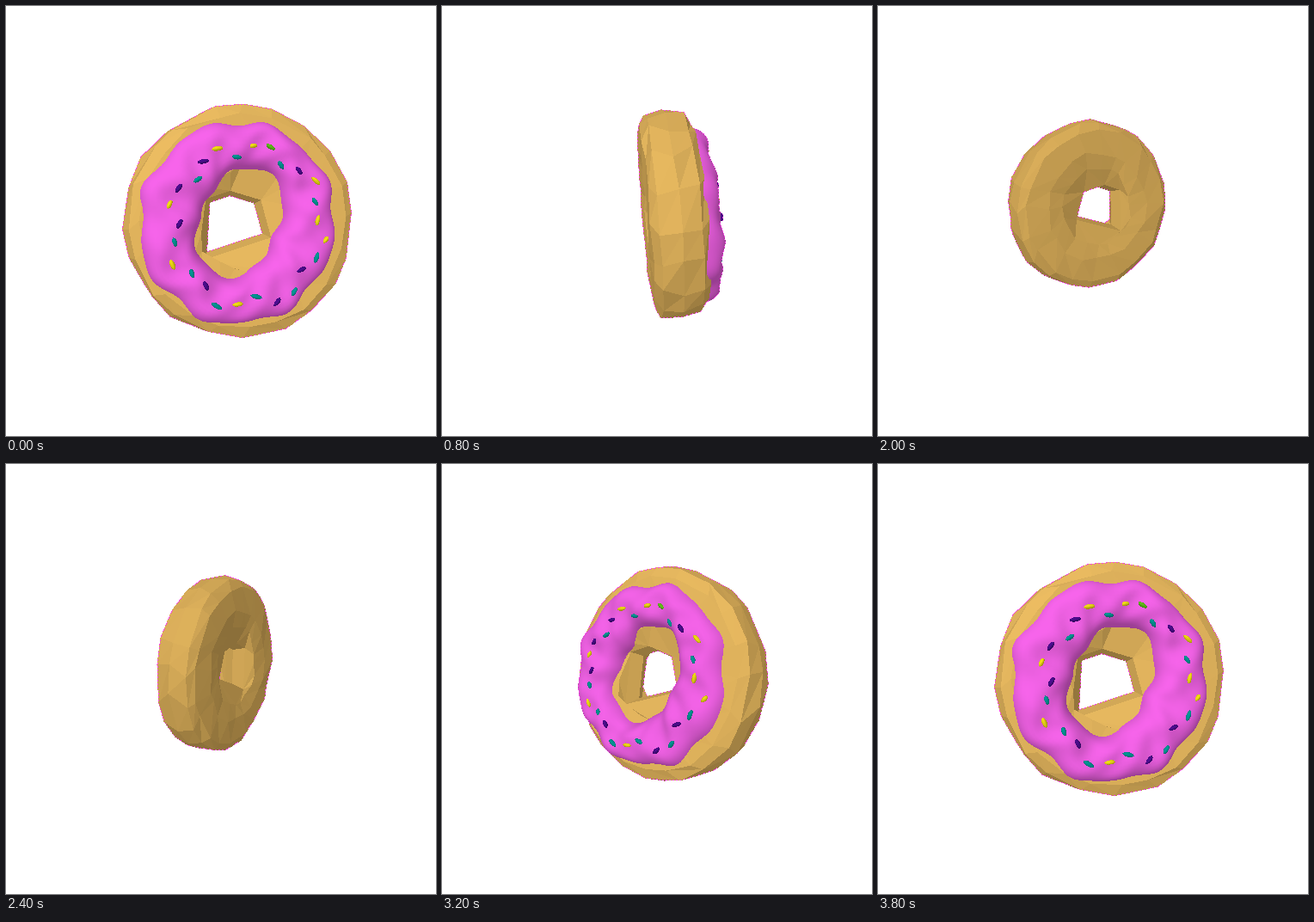
Animation of 500 by 500 pixels, one loop 3.9 s. Source, as an HTML page with a canvas:

```html
<!DOCTYPE html>
<html lang="en">
<head>
<meta charset="utf-8">
<title>Turning donut</title>
<style>
html, body { margin: 0; height: 100%; overflow: hidden; background: #fff; }
canvas { display: block; width: 100vmin; height: 100vmin; }
</style>
</head>
<body>
<canvas id="view" width="500" height="500"></canvas>
<script>
const SIZE = 500, TAU = Math.PI * 2, RAD = Math.PI / 180;
const { sin, cos, abs, sign, hypot, atan2, min, max, floor, ceil, PI } = Math;
const ctx = document.getElementById('view').getContext('2d');
const image = ctx.createImageData(SIZE, SIZE);
const depth = new Float32Array(SIZE * SIZE);

const lerp = (a, b, u) => a + (b - a) * u;
const wrap = a => ((a % TAU) + TAU) % TAU;
let seed = 11;
const jitter = n => {
  seed = (seed * 16807) % 2147483647;
  return (seed / 2147483647 * 2 - 1) * n;
};

// Pose: tick, yaw in degrees, screen x of the centre
const KEYS = [[0, 14, 272], [7, 95, 262], [11, 135, 258], [19, 206, 247],
  [27, 273, 255], [31, 325, 261], [37, 374, 272]];
const LAST = 37, TILT = 4.5 * RAD;

function poseAt(tick) {
  const i = max(1, KEYS.findIndex(k => k[0] >= tick));
  const a = KEYS[i - 1], b = KEYS[i], u = (tick - a[0]) / (b[0] - a[0]);
  const near = cos(tick / LAST * TAU);
  return { yaw: lerp(a[1], b[1], u) * RAD, x: lerp(a[2], b[2], u), z: 109 * near, light: 0.965 + 0.035 * near };
}

function rotate([x, y, z], yaw) {
  const y1 = y * cos(TILT) - z * sin(TILT), z1 = y * sin(TILT) + z * cos(TILT);
  return [x * cos(yaw) + z1 * sin(yaw), y1, z1 * cos(yaw) - x * sin(yaw)];
}

function project(p, pose) {
  const [x, y, z] = rotate(p, pose.yaw);
  const k = 591 / (700 - pose.z - z);
  return [pose.x + k * x, 183.5 + k * (63 + y), k];
}

// Triangles
const tris = [];
const sub = (a, b) => a.map((v, i) => v - b[i]);
const cross = (a, b) => [a[1] * b[2] - a[2] * b[1], a[2] * b[0] - a[0] * b[2], a[0] * b[1] - a[1] * b[0]];

function addGrid(cols, rows, closed, color, flat, point) {
  const grid = [];
  for (let i = 0; i < cols; i++) {
    grid.push([]);
    for (let j = 0; j < rows; j++) grid[i].push({ p: point(i, j), n: [0, 0, 0] });
  }
  const face = (a, b, c) => {
    const n = cross(sub(b.p, a.p), sub(c.p, a.p));
    if (hypot(...n) < 1e-4) return;
    const verts = flat ? [a, b, c].map(v => ({ p: v.p, n: [0, 0, 0] })) : [a, b, c];
    for (const v of verts) v.n = v.n.map((m, i) => m + n[i]);
    tris.push({ verts, color });
  };
  for (let i = 0; i < cols; i++) {
    const next = grid[(i + 1) % cols];
    for (let j = 0; j < rows - (closed ? 0 : 1); j++) {
      const k = (j + 1) % rows;
      face(grid[i][j], grid[i][k], next[j]);
      face(next[j], grid[i][k], next[k]);
    }
  }
}

// Dough: faceted ring, boxy outside, with a five-sided hole
const HOLE = [[-36, -19], [-13, -26], [16, -17], [25, 18], [-40, 36]];
const SIDES = 20, RINGS = 12;
const bend = (v, e) => sign(v) * abs(v) ** e;
addGrid(SIDES, RINGS, true, [218, 174, 90], true, (i, j) => {
  const a = i / SIDES * TAU, t = PI - j / RINGS * TAU;
  const e = cos(t) > 0.01 ? 0.55 : 1;
  const r = 83 + 50 * bend(cos(t), e), z = 3 + 34 * bend(sin(t), e);
  if (r < 50) {
    const off = h => abs(wrap(atan2(h[1], h[0]) - a + PI) - PI);
    const h = HOLE.reduce((best, c) => off(c) < off(best) ? c : best);
    const grow = r < 35 ? 1 : 1.22;
    return [h[0] * grow, h[1] * grow, z];
  }
  const b = a + jitter(0.08), s = r + jitter(r > 100 ? 2 : 5);
  return [s * cos(b), s * sin(b), z + jitter(1.5)];
});

// Icing: lobed band around its own centre
const CX = -7, CY = 2, COLS = 144, ROWS = 20;
const inner = a => 52 + 9 * cos(2 * (a - 118 * RAD)) + 2 * cos(7 * a);
const outer = a => 111 + 3 * cos(8 * (a - 20 * RAD)) + 1.5 * sin(13 * a);

function icingZ(a, v) {
  const bulge = Math.sqrt(max(0, 1 - abs(2 * v - 1) ** 3));
  const lumps = 2.2 * sin(8 * a + 5 * v) + 1.8 * sin(13 * a - 6 * v);
  return 24 + 28 * bulge + lumps * sin(PI * v);
}

addGrid(COLS, ROWS, false, [229, 93, 218], false, (i, j) => {
  const a = i / COLS * TAU, v = (1 - cos(PI * j / (ROWS - 1))) / 2;
  const r = lerp(inner(a), outer(a), v);
  return [CX + r * cos(a), CY + r * sin(a), icingZ(a, v)];
});

// Sprinkles: evenly round the band, weaving in and out, roughly along it
const COLORS = { y: [228, 208, 20], t: [0, 142, 142], p: [72, 12, 135], g: [92, 180, 24] };
const ORDER = 'tygtpytyytptptytptytpyptpy';
[...ORDER].forEach((key, n) => {
  const a = (n / ORDER.length * 360 - 97) * RAD;
  const r = 82 + 6 * cos(a - 45 * RAD) + 8 * cos((n - 1.6) * TAU / 3.3);
  const x = CX + r * cos(a), y = CY + r * sin(a);
  const z = icingZ(a, (r - inner(a)) / (outer(a) - inner(a)));
  const dir = a + PI / 2 + jitter(0.6), c = cos(dir), s = sin(dir);
  const len = 6 + jitter(1), wide = 2.6;
  addGrid(10, 7, false, COLORS[key], false, (i, j) => {
    const b = i / 10 * TAU, t = j / 6 * PI;
    const u = len * sin(t) * cos(b), w = wide * sin(t) * sin(b);
    return [x + u * c - w * s, y + u * s + w * c, z + 3 * cos(t)];
  });
});

const LIGHT = [-0.25, -0.45, 0.86];
function shade(n, pose) {
  const m = rotate(n, pose.yaw), len = hypot(...m) || 1;
  const dot = (m[0] * LIGHT[0] + m[1] * LIGHT[1] + m[2] * LIGHT[2]) / len;
  return (0.68 + 0.4 * max(0, dot)) * pose.light;
}

function put(i, r, g, b) {
  image.data[i * 4] = r;
  image.data[i * 4 + 1] = g;
  image.data[i * 4 + 2] = b;
}

function fill(tri, pose) {
  const [a, b, c] = tri.verts.map(v => project(v.p, pose));
  const [la, lb, lc] = tri.verts.map(v => shade(v.n, pose));
  const area = (b[0] - a[0]) * (c[1] - a[1]) - (b[1] - a[1]) * (c[0] - a[0]);
  if (abs(area) < 1e-6) return;
  const x0 = ceil(min(a[0], b[0], c[0])), x1 = floor(max(a[0], b[0], c[0]));
  const y0 = ceil(min(a[1], b[1], c[1])), y1 = floor(max(a[1], b[1], c[1]));
  for (let y = y0; y <= y1; y++) {
    for (let x = x0; x <= x1; x++) {
      const u = ((b[0] - x) * (c[1] - y) - (b[1] - y) * (c[0] - x)) / area;
      const v = ((c[0] - x) * (a[1] - y) - (c[1] - y) * (a[0] - x)) / area;
      const w = 1 - u - v;
      if (u < -1e-6 || v < -1e-6 || w < -1e-6) continue;
      const k = u * a[2] + v * b[2] + w * c[2], i = y * SIZE + x;
      if (k <= depth[i]) continue;
      depth[i] = k;
      const l = u * la + v * lb + w * lc;
      put(i, tri.color[0] * l, tri.color[1] * l, tri.color[2] * l);
    }
  }
}

// Dotted magenta rim along the silhouette
function rim() {
  for (let i = SIZE; i < depth.length - SIZE; i++) {
    if (!depth[i] || (i % SIZE * 7 + floor(i / SIZE) * 3) % 4 > 1) continue;
    if (!(depth[i - 1] && depth[i + 1] && depth[i - SIZE] && depth[i + SIZE])) put(i, 245, 70, 225);
  }
}

function draw(tick) {
  const pose = poseAt(tick);
  image.data.fill(255);
  depth.fill(0);
  for (const tri of tris) fill(tri, pose);
  rim();
  ctx.putImageData(image, 0, 0);
}

let shown = -1;
function loop() {
  const tick = max(0, floor(performance.now() % 3900 / 100) - 1);
  if (tick !== shown) draw(shown = tick);
  requestAnimationFrame(loop);
}
loop();
</script>
</body>
</html>
```
